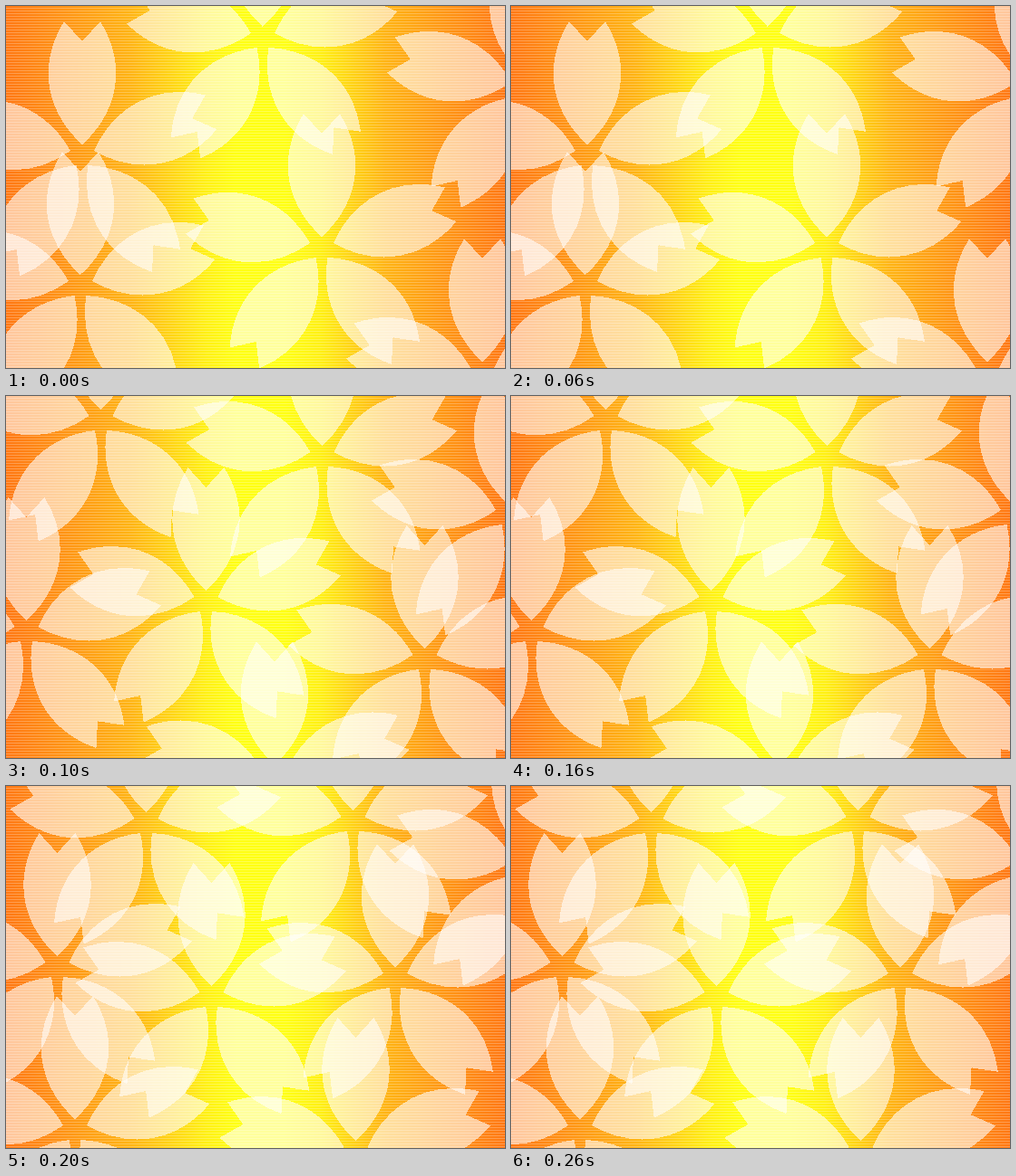
An HTML page that plays this animation: 550x400 px, repeating every 0.3 s.

```html
<!DOCTYPE html>
<html lang="en">
<head>
<meta charset="utf-8">
<title>Cherry blossoms</title>
<style>
  html, body { margin: 0; width: 100%; height: 100%; overflow: hidden; }
  svg { display: block; width: 550px; height: 400px; }
  .pose { animation: show 300ms step-end infinite; }
  .pose:nth-of-type(2) { animation-delay: -200ms; }
  .pose:nth-of-type(3) { animation-delay: -100ms; }
  @keyframes show {
    0% { visibility: visible; }
    33.3333%, 100% { visibility: hidden; }
  }
</style>
</head>
<body>
<svg viewBox="0 0 550 400" shape-rendering="crispEdges">
  <defs>
    <linearGradient id="glow">
      <stop offset="0" stop-color="#ff7814"/>
      <stop offset=".25" stop-color="#ffb414"/>
      <stop offset=".4" stop-color="#fff014"/>
      <stop offset=".46" stop-color="#ffff14"/>
      <stop offset=".56" stop-color="#ffff14"/>
      <stop offset=".63" stop-color="#fff014"/>
      <stop offset=".76" stop-color="#ffb414"/>
      <stop offset="1" stop-color="#ff7814"/>
    </linearGradient>
    <pattern id="lines" width="3" height="3" patternUnits="userSpaceOnUse">
      <rect y="2" width="3" height="1" fill="#fff" fill-opacity=".25"/>
    </pattern>
    <path id="petal" d="M0 0C36-32 52-84 20-136L0-114-20-136C-52-84-36-32 0 0Z"/>
    <g id="flower" fill="#fff" fill-opacity=".58">
      <use href="#petal" transform="translate(0 -13)"/>
      <use href="#petal" transform="translate(13 -6) rotate(71.7)"/>
      <use href="#petal" transform="translate(6.5 10) rotate(140.8)"/>
      <use href="#petal" transform="translate(-6.5 10) rotate(215.3)"/>
      <use href="#petal" transform="translate(-13 -6) rotate(-77.3)"/>
    </g>
  </defs>
  <rect width="550" height="400" fill="url(#glow)"/>
  <rect width="550" height="400" fill="url(#lines)"/>
  <g class="pose">
    <use href="#flower" x="84" y="166"/>
    <use href="#flower" x="82" y="310"/>
    <use href="#flower" x="348" y="268"/>
    <use href="#flower" x="283" y="36"/>
    <use href="#flower" x="570" y="90"/>
    <use href="#flower" x="525" y="406"/>
  </g>
  <g class="pose">
    <use href="#flower" x="104.5" y="28"/>
    <use href="#flower" x="348.5" y="68"/>
    <use href="#flower" x="220.5" y="228"/>
    <use href="#flower" x="22.5" y="261"/>
    <use href="#flower" x="461.5" y="292"/>
    <use href="#flower" x="553" y="132"/>
    <use href="#flower" x="296" y="420.5"/>
  </g>
  <g class="pose">
    <use href="#flower" x="154.5" y="42"/>
    <use href="#flower" x="382.5" y="40"/>
    <use href="#flower" x="56.5" y="201"/>
    <use href="#flower" x="226.5" y="234"/>
    <use href="#flower" x="429" y="213"/>
    <use href="#flower" x="76" y="381"/>
    <use href="#flower" x="385.5" y="405"/>
    <use href="#flower" x="572.5" y="88"/>
  </g>
</svg>
</body>
</html>
```
